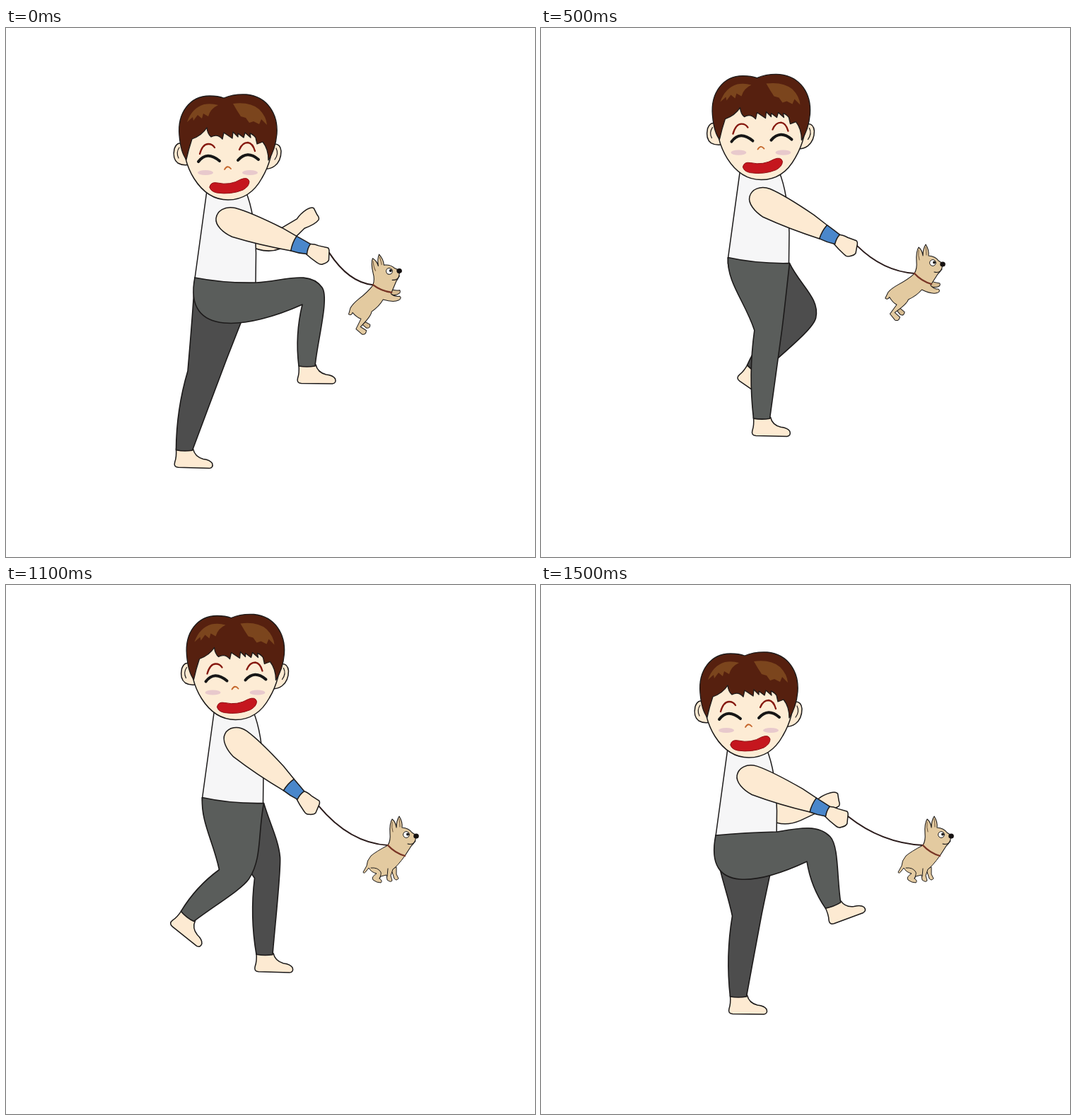
An HTML page with a canvas for the animation above (1600 ms loop, 748 by 748 pixels).

```html
<!DOCTYPE html>
<html lang="en">
<head>
<meta charset="utf-8">
<title>Walking the dog</title>
<style>
  html, body { margin: 0; width: 100%; height: 100%; overflow: hidden; background: #fff; }
  canvas { display: block; width: 100vw; height: 100vh; }
</style>
</head>
<body>
<canvas id="stage" width="748" height="748"></canvas>
<script>
const ctx = document.getElementById('stage').getContext('2d');
const STEPS = 16, STEP_MS = 100;
const INK = '#1c1a1a', SKIN = '#fdead2', FUR = '#e3caa0';

// step, body x, body y
const BODY = [
  [0, 0, 0], [3, -7, -40], [4, -8, -37], [6, 0, -17], [7, -18.5, 3], [8, -2, -5],
  [9, 1, -22], [11, 10.5, -52.5], [12, 12, -49], [14, 8, -18], [15, -20, 1]
];
// step, near arm angle, far elbow x y, far wrist x y
const ARMS = [
  [0, 19, 375, 309, 418, 275], [3, 30.5, 325, 348, 379, 361], [7, 21.8, 246, 315, 265, 377],
  [9, 26, 252, 316, 271, 380], [11, 39.7, 280, 338, 310, 385], [14, 25, 337, 346, 402, 345],
  [15, 22.4, 355, 331, 417, 308]
];
// step, knee front x y, knee back x y, ankle x y, foot angle
const LEG = [
  [0, 447, 367, 419, 391, 425.5, 478, 0], [1, 436, 396, 408, 417, 416, 505, 0],
  [3, 377, 437, 341, 467, 355, 575, 1], [6, 331, 461, 291, 450, 299, 579, 0],
  [7, 331, 470, 290.5, 467, 299, 581, 0], [8, 312, 468, 257, 485, 252, 597, 1],
  [9, 297, 491, 259, 475, 213, 563, 27], [10, 313, 482, 273, 466, 197, 540, 42],
  [11, 333, 468, 291, 455, 246, 521, 38], [14, 418, 416, 364, 432, 341, 501, 25],
  [15, 429, 355, 396, 390, 433, 452, -21]
];
// collar x y, tilt
const LEAPS = [[532, 368, -34], [540, 354, -24], [568, 358, 0]];

const clamp01 = v => Math.max(0, Math.min(1, v));
const mix = (a, b, t) => a + (b - a) * t;
const rad = deg => deg * Math.PI / 180;

// Smooth cyclic interpolation through the keyed rows.
function sample(keys, t) {
  const n = keys.length;
  const key = i => {
    const k = keys[(i + n) % n];
    return [k[0] + Math.floor(i / n) * STEPS, ...k.slice(1)];
  };
  let i = n - 1;
  while (keys[i][0] > t) i--;
  const [a, b, c, d] = [key(i - 1), key(i), key(i + 1), key(i + 2)];
  const h = c[0] - b[0], s = (t - b[0]) / h, s2 = s * s, s3 = s2 * s;
  return b.slice(1).map((v, j) => {
    const w = c[j + 1];
    const m0 = (w - a[j + 1]) / (c[0] - a[0]), m1 = (d[j + 1] - v) / (d[0] - b[0]);
    return (2 * s3 - 3 * s2 + 1) * v + (s3 - 2 * s2 + s) * h * m0 +
      (3 * s2 - 2 * s3) * w + (s3 - s2) * h * m1;
  });
}

function paint(path, fill, stroke = INK, width = 1.5) {
  const p = typeof path === 'string' ? new Path2D(path) : path;
  if (fill) { ctx.fillStyle = fill; ctx.fill(p); }
  if (stroke) { ctx.strokeStyle = stroke; ctx.lineWidth = width; ctx.stroke(p); }
}

function disc(x, y, rx, ry, fill, stroke = null, width = 1) {
  const p = new Path2D();
  p.ellipse(x, y, rx, ry, 0, 0, 7);
  paint(p, fill, stroke, width);
}

function placed(x, y, deg, draw) {
  ctx.save();
  ctx.translate(x, y);
  ctx.rotate(rad(deg));
  draw();
  ctx.restore();
}

function drawLeg(phase, color) {
  const [fx, fy, bx, by, ax, ay, deg] = sample(LEG, phase);
  placed(ax, ay, deg, () => paint('M-11.5-2Q-10.500 10-13 17Q-15 24-8 24.500L36 25Q42 24 40 18Q37 13 27 12Q15 9 12.500-2Z', SKIN));

  const lx = 267, ly = 353, rx = 354, ry = Math.min(361, fy - 7);
  const ux = 11.5 * Math.cos(rad(deg)), uy = 11.5 * Math.sin(rad(deg));
  const unit = (x, y) => { const l = Math.hypot(x, y); return [x / l, y / l, l]; };
  const thigh = unit(fx - rx, fy - ry), shin = unit(ax + ux - fx, ay + uy - fy);
  const knee = unit(thigh[0] + shin[0] * 1.2, thigh[1] + shin[1] * 1.2);
  const bend = clamp01(1 - thigh[0] * shin[0] - thigh[1] * shin[1]);
  const calf = unit(ax - ux - bx, ay - uy - by);
  const dx = bx - lx, ratio = dx / (by - ly);
  const seat = clamp01((ratio - .65) / 1.2), sag = clamp01((ratio - .65) / 3);
  const pull = thigh[2] * mix(.3, .34, bend), lead = thigh[2] * .4;
  const lift = mix(0, -8, clamp01((375 - fy) / 15));

  const p = new Path2D();
  p.moveTo(lx, ly);
  p.quadraticCurveTo(308, ry + 1, rx, ry);
  p.bezierCurveTo(rx + thigh[0] * lead, ry + thigh[1] * lead + lift,
    fx - knee[0] * pull, fy - knee[1] * pull, fx, fy);
  p.bezierCurveTo(fx + knee[0] * 18, fy + knee[1] * 18,
    ax + ux - shin[0] * 35, ay + uy - shin[1] * 35, ax + ux, ay + uy);
  p.quadraticCurveTo(ax - uy * .2, ay + 2, ax - ux, ay - uy);
  p.quadraticCurveTo((ax - ux + bx) / 2 - calf[1] * 8, (ay - uy + by) / 2 + calf[0] * 8, bx, by);
  p.bezierCurveTo(bx - dx * mix(.35, .5, seat), by + mix(-40, 34, sag),
    lx - 2 - 15 * seat, ly + 35 + 51 * seat, lx, ly);
  p.closePath();
  paint(p, color, INK, 1.6);
}

function drawFarArm(ex, ey, wx, wy) {
  const sx = 318, sy = 276;
  const la = Math.hypot(ex - sx, ey - sy), lb = Math.hypot(wx - ex, wy - ey);
  const a = [(ex - sx) / la, (ey - sy) / la], b = [(wx - ex) / lb, (wy - ey) / lb];
  const k = 14 / (1 + a[0] * b[0] + a[1] * b[1]);
  const upper = (d, s) => [sx + a[0] * d - a[1] * s * 15, sy + a[1] * d + a[0] * s * 15];
  const fore = (d, s) => [wx + b[0] * d - b[1] * s, wy + b[1] * d + b[0] * s];
  const elbow = s => [ex - (a[1] + b[1]) * k * s, ey + (a[0] + b[0]) * k * s];
  const p = new Path2D();
  p.moveTo(...upper(0, 1));
  p.lineTo(...upper(la * .5, 1));
  p.quadraticCurveTo(...elbow(1), ...fore(-lb * .55, 12));
  p.lineTo(...fore(-2, 9));
  p.quadraticCurveTo(...fore(14, 14), ...fore(21, 12));
  p.quadraticCurveTo(...fore(24, 11), ...fore(24, 5));
  p.lineTo(...fore(26, -5));
  p.quadraticCurveTo(...fore(25, -9), ...fore(17, -10));
  p.quadraticCurveTo(...fore(6, -11), ...fore(-2, -8));
  p.lineTo(...fore(-lb * .55, -12));
  p.quadraticCurveTo(...elbow(-1), ...upper(la * .5, -1));
  p.lineTo(...upper(0, -1));
  paint(p, SKIN);
}

function drawTorso() {
  paint('M284 230L267 354Q305 363 353 361L353.500 318Q352 262 339 231Z', '#f6f6f7');
}

function drawNearArm(deg) {
  placed(315, 272, deg, () => {
    paint('M118-5Q124-8 132-7.500L145-9Q148-8 149-3L152 7Q152 11 146 15Q143 18 138 16Q127 13 118 9Z', SKIN);
    paint('M98-10L75-14.500Q25-21 3-19.500C-12-18-20-7-18 3C-16 13-2 19 12 20.500Q53 19 97 12Z', SKIN);
    paint('M98-10Q110-8 120-6Q118 1 120 9Q108 12 97 12Q95 1 98-10Z', '#4a87cb');
  });
}

function drawHead() {
  paint('M250 164Q242 160 238 171Q235 185 243 191Q250 195 260 193Z', SKIN);
  paint('M380 164Q388 164 389 174Q389 188 380 195Q373 200 366 199Z', SKIN);
  paint('M245 169Q240 176 244 184M382 170Q386 178 380 186', null, INK, 1.2);
  paint('M250 150Q250 188 266 213Q285 243 314 243Q345 243 362 212Q378 185 378 150L340 125L285 125Z', '#fdecd5');
  paint('M255 186Q247 176 245 152C242 120 260 96 288 96Q300 96 308 99Q322 93 340 94C370 97 385 122 383 150Q381 172 371 187Q371 171 363 161L355 164L353 155Q349 150 345 149L346 155L338 148L336 155L328 149L328 154L321 147L320 156L308 148L306 157Q299 149 290 154Q285 150 284 141Q277 152 263 157Q258 172 255 186Z', '#56200f', INK, 1.3);
  paint('M256 133Q263 113 280 108Q290 106 300 109Q289 114 286 125L279 121L277 128L271 123L265 131L264 126Z', '#7b451d', null);
  paint('M321 107Q345 104 358 115Q368 125 369 137L361 129L358 136L350 132L344 134L339 127L332 125Q326 116 321 107Z', '#7b451d', null);
  paint('M274 178Q278 164 286 164Q292 164 295 169M330 172Q334 162 342 162Q349 163 352 174', null, '#86190f', 2.3);
  paint('M272 189Q284 173 302 188M328 187Q341 172 357 186', null, '#161616', 4);
  paint('M309 200Q313 193 318 199', null, '#c4652a', 1.8);
  disc(282, 204.5, 11, 3.6, '#e8c9cc');
  disc(345, 204.5, 11, 3.6, '#e8c9cc');
  paint('M288 225Q289 217 299 219Q317 223 332 214Q342 210 344 217Q344 224 335 229Q318 236 298 233Q289 231 288 225Z', '#c5161e', '#8f1014', 1);
}

function drawDogHead() {
  paint('M-12-7Q-8-14-9-23Q-10-38-6-44Q-1-40 0-32Q0-42 4-48Q9-40 8-32Q18-31 22-25L28-21Q28-12 21-6L12 8Q-2 4-12-7Z', FUR, INK, 1.1);
  paint('M-6-40Q-7-32-5-26M4-44Q5-38 5-33', null, '#6b5138', 1);
  disc(14, -22, 4.4, 4.4, '#fff', INK, 1);
  disc(16, -22.5, 2, 2, INK);
  disc(28, -20, 3.8, 3.5, '#151111');
  paint('M16-9Q23-7 27-13', null, INK, 1.2);
  paint('M-12-7Q-2 4 12 8', null, '#7a3626', 2.3);
}

function drawSittingDog() {
  paint('M-7 28L-3 40Q0 44 3 40L0 34L0 24Z', FUR, INK, 1);
  paint('M-12-7Q-29 2-36 8Q-42 15-42 22L-47 31Q-46 34-43 30L-39 25Q-36 31-28 33Q-36 38-33 42Q-28 46-22 46Q-19 43-24 40L-22 37L-14 35L-13 42Q-8 46-6 43Q-7 39-8 36L-5 27Q1 23 12 8Z', FUR, INK, 1);
  paint('M-36 25Q-26 24-22 31Q-21 34-24 40M-12 26L-13 37', null, INK, 1);
  drawDogHead();
}

function drawLeapingDog(kick) {
  const k = x => x - 18 * kick;
  paint(`M-40 14Q-38 24 ${k(-34)} 27L${k(-32)} 34Q${k(-28)} 38 ${k(-25)} 33L${k(-29)} 25L-26 14Z`, '#d6bb90', INK, 1);
  paint('M0 9Q6 17 12 19Q19 21 19 16Q13 13 9 8Z', '#d6bb90', INK, 1);
  paint(`M-8-11Q-20-7-36-6Q-47-5-53-2L-60 4Q-58 8-54 5Q-53 14-49 19L${k(-45)} 27L${k(-42)} 38Q${k(-38)} 42 ${k(-34)} 37L${k(-38)} 28Q-35 24-31 19Q-18 19-8 14Q2 26 10 27Q16 27 14 23Q8 20 6 14L7 10Z`, FUR, INK, 1);
  placed(0, 0, 24, drawDogHead);
}

function drawDog(step, hand) {
  const sitting = step % 4 === 3;
  const low = step === 3;
  const [x, y, tilt] = sitting ? (low ? [538, 387, 0] : [552, 375, 0]) : LEAPS[step % 4];
  const turn = rad(sitting ? 0 : tilt + 24);
  const cx = x - 12 * Math.cos(turn) + 7 * Math.sin(turn);
  const cy = y - 12 * Math.sin(turn) - 7 * Math.cos(turn);
  const leash = new Path2D();
  leash.moveTo(hand[0], hand[1]);
  leash.quadraticCurveTo(mix(hand[0], cx, .45), cy - 3, cx, cy);
  paint(leash, null, '#2b1c1c', 2);
  placed(x, y, tilt, sitting ? drawSittingDog : () => drawLeapingDog(step % 4 === 2 ? 0 : 1));
}

function draw(step) {
  const [x, y] = sample(BODY, step);
  const [arm, ...far] = sample(ARMS, step);
  ctx.fillStyle = '#fff';
  ctx.fillRect(0, 0, 748, 748);
  ctx.lineJoin = ctx.lineCap = 'round';

  placed(x, y, 0, () => {
    drawFarArm(...far);
    drawLeg((step + STEPS / 2) % STEPS, '#4d4d4d');
    drawTorso();
    drawLeg(step, '#5a5d5b');
    drawHead();
  });
  const c = Math.cos(rad(arm)), s = Math.sin(rad(arm));
  drawDog(step, [x + 315 + 149 * c + 3 * s, y + 272 + 149 * s - 3 * c]);
  placed(x, y, 0, () => drawNearArm(arm));
}

let shown = -1;
function tick() {
  const step = Math.floor(performance.now() / STEP_MS) % STEPS;
  if (step !== shown) draw(shown = step);
  requestAnimationFrame(tick);
}
tick();
</script>
</body>
</html>
```
